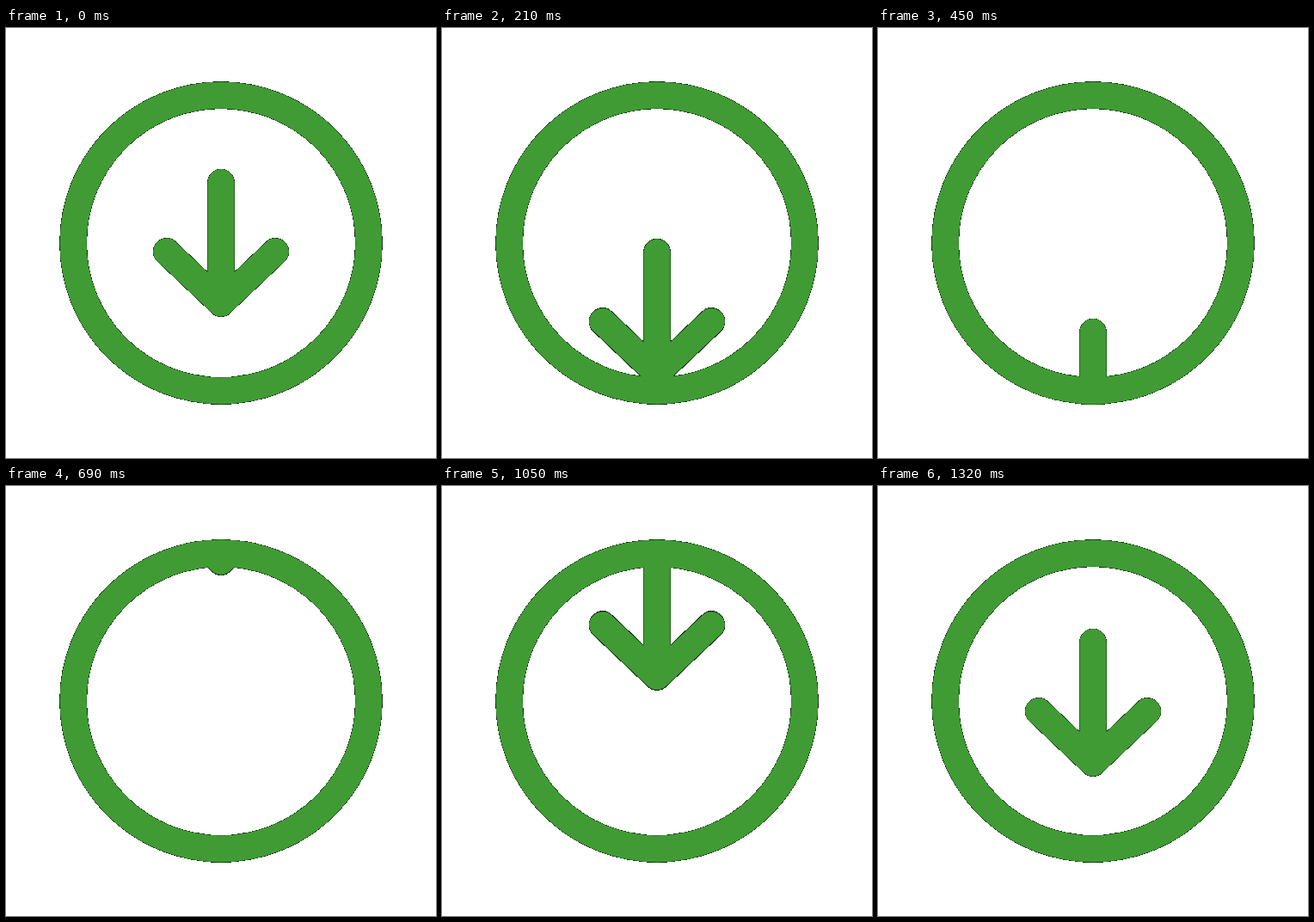
An HTML page without scripts that plays this animation: 500x500 px, repeating every 3.18 s.

```html
<!DOCTYPE html>
<html lang="en">
<head>
<meta charset="utf-8">
<title>Download arrow</title>
<style>
  html, body { margin: 0; height: 100%; overflow: hidden; background: #fff; }
  svg { display: block; width: 100%; height: 100%; }
  .icon {
    fill: none;
    stroke: #409b35;
    stroke-width: 31.25;
    stroke-linecap: round;
    stroke-linejoin: round;
  }
  /* Leaves through the bottom, re-enters from the top, then rests. */
  .arrow { animation: drop 3180ms -2ms infinite steps(22, end); }
  @keyframes drop {
    0% { transform: translateY(0); }
    20.7547% { transform: translateY(255.2px); }
    20.7548% { transform: translateY(-243.6px); }
    41.5094%, 100% { transform: translateY(2px); }
  }
</style>
</head>
<body>
<svg viewBox="0 0 500 500">
  <defs>
    <clipPath id="disc"><circle cx="250" cy="250" r="187.5"/></clipPath>
    <!-- Darkens the soft edge pixels into a thin hard outline -->
    <filter id="edge" filterUnits="userSpaceOnUse" x="0" y="0" width="500" height="500" color-interpolation-filters="sRGB">
      <feFlood flood-color="#000" result="black"/>
      <feMerge result="matte">
        <feMergeNode in="black"/>
        <feMergeNode in="SourceGraphic"/>
      </feMerge>
      <feComponentTransfer in="SourceAlpha" result="mask">
        <feFuncA type="linear" slope="200" intercept="-20"/>
      </feComponentTransfer>
      <feComposite in="matte" in2="mask" operator="in"/>
    </filter>
  </defs>
  <g class="icon" filter="url(#edge)">
    <circle cx="250" cy="250" r="171.875"/>
    <g clip-path="url(#disc)">
      <path class="arrow" d="M250 179.7V320M186.7 260L250 320L313.3 260"/>
    </g>
  </g>
</svg>
</body>
</html>
```
